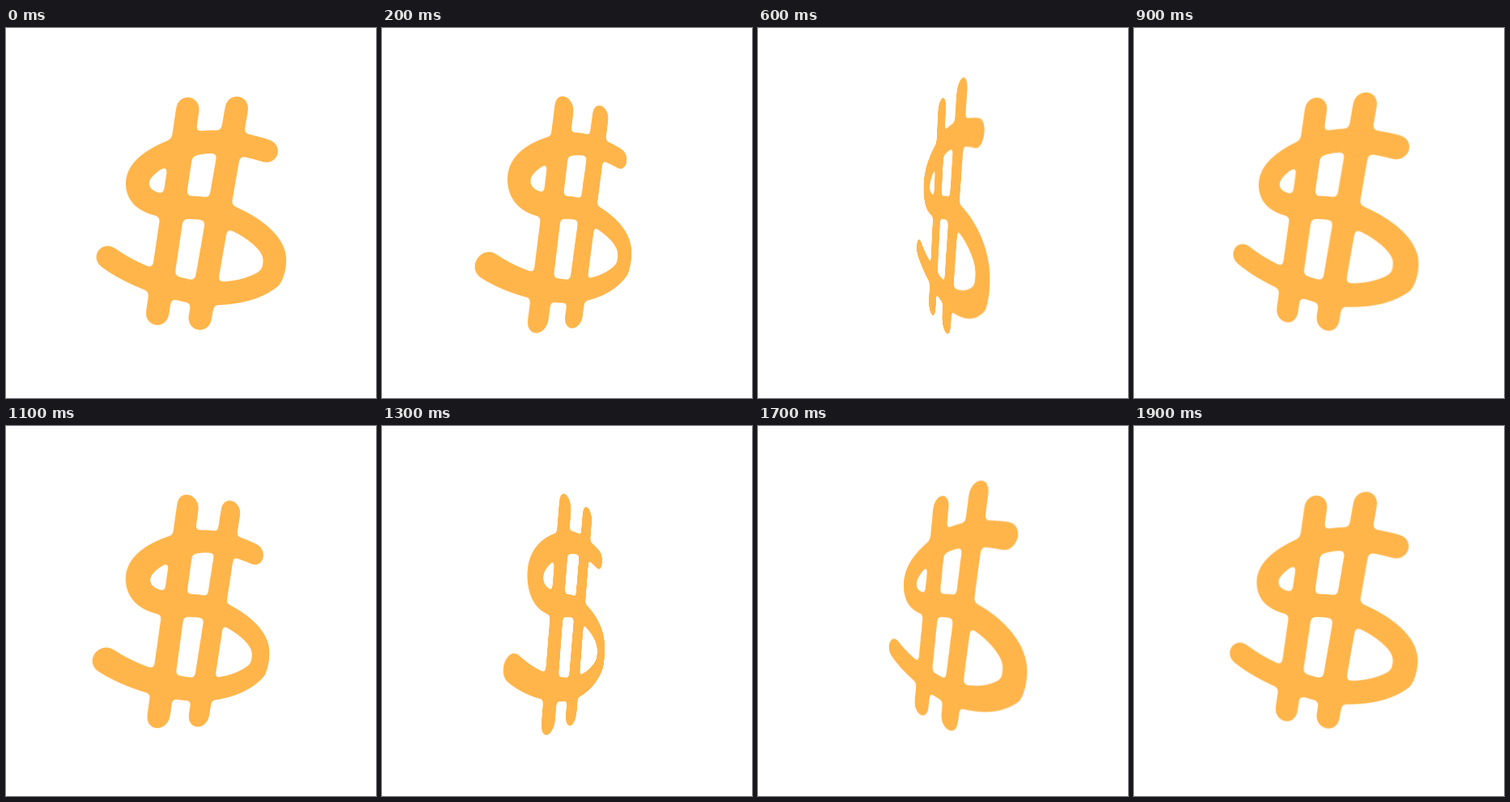
An HTML page that plays this animation: 457 px wide and 457 px high, repeating every 1.95 s.

```html
<!DOCTYPE html>
<html>
<head>
<meta charset="utf-8">
<title>Spinning dollar sign</title>
<style>
  html, body { margin: 0; height: 100%; overflow: hidden; background: #fff; }
  svg { display: block; width: 100vw; height: 100vh; }
  path { fill: none; stroke: #ffb54a; stroke-width: 28.5; stroke-linecap: round; }
</style>
</head>
<body>
<svg id="sign" viewBox="0 0 457 457">
  <!-- Blur and sharpen again, which rounds the corners where strokes meet. -->
  <filter id="soften" filterUnits="userSpaceOnUse" x="0" y="0" width="457" height="457"
          color-interpolation-filters="sRGB">
    <feGaussianBlur stdDeviation="3"/>
    <feComponentTransfer><feFuncA type="linear" slope="8" intercept="-3.5"/></feComponentTransfer>
  </filter>
  <g filter="url(#soften)">
    <path d="M224.5 99.5 L187 353"/>
    <path d="M285 98.5 L239.5 359"/>
    <path d="M322 152 C295 143 265 139 245 141 S162 162 162 192 S205 221 235 222
             S332 254 332 286 Q332 298 327 308 C310 322 285 328 255 328 S165 312 125.5 283"/>
  </g>
</svg>
<script>
const LOOP = 1950, STEP = 50;
const sign = document.getElementById('sign');
const start = performance.now();

function tick() {
  const time = (performance.now() - start) % LOOP;
  const turn = Math.floor(time / STEP) * STEP / LOOP * 360;
  // Both faces read the same way, so the angle wraps every half turn.
  const angle = (turn + 90) % 180 - 90;
  sign.style.transform = `perspective(86vw) rotateY(${angle}deg)`;
  requestAnimationFrame(tick);
}
tick();
</script>
</body>
</html>
```
